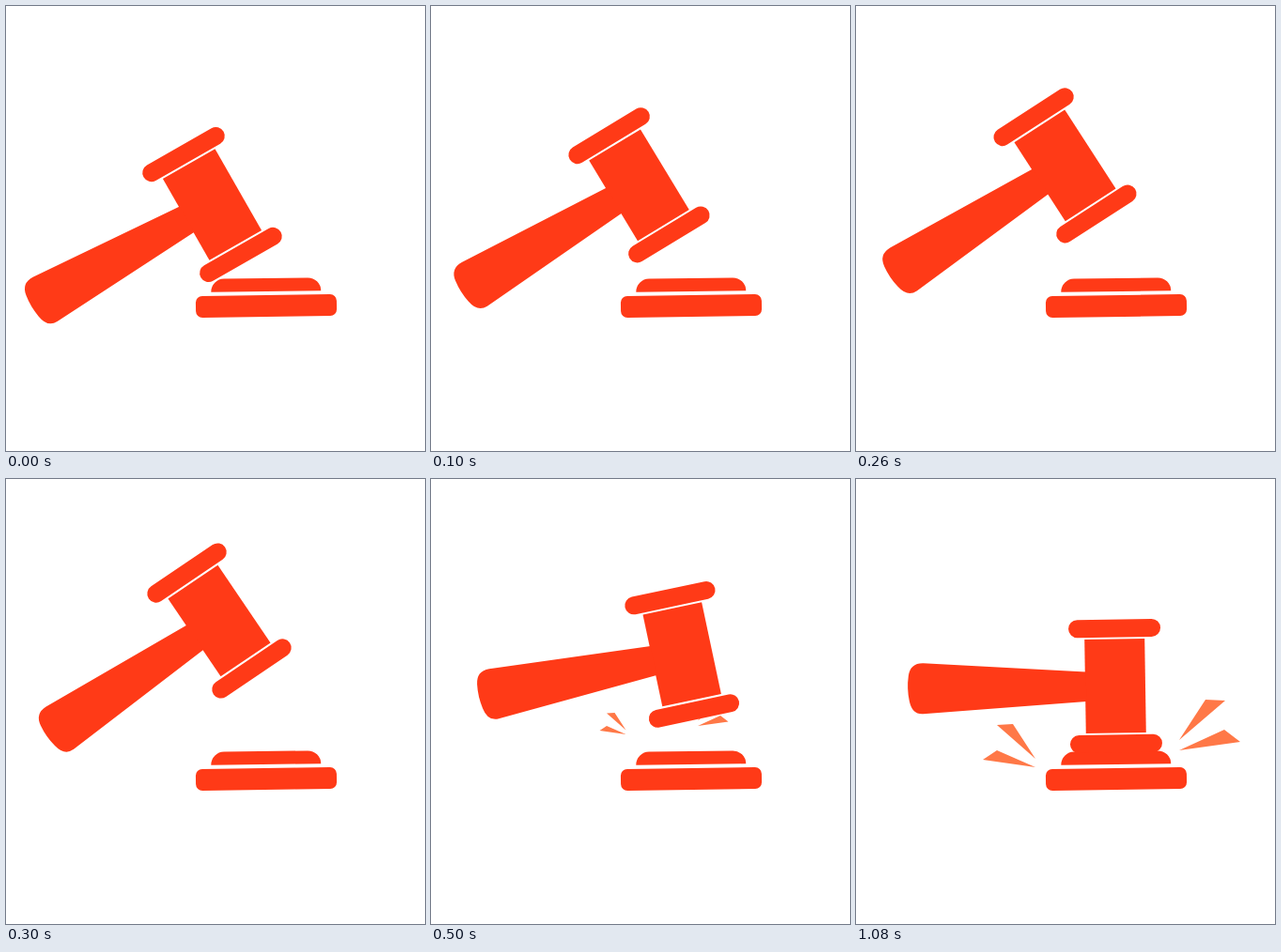
An HTML page that plays this animation: 446x474 px, repeating every 1400 ms.

```html
<!DOCTYPE html>
<html lang="en">
<head>
<meta charset="utf-8">
<title>Gavel</title>
<style>
  html, body { margin: 0; width: 100%; height: 100%; overflow: hidden; background: #fff; }
  svg { display: block; width: 100%; height: 100%; fill: #ff3a17; }
</style>
</head>
<body>
<svg viewBox="0 0 446 474">
  <g transform="translate(277 319.5) rotate(-0.8)">
    <rect x="-75" y="-11.5" width="150" height="23" rx="7"/>
    <path d="M-58.5-15.5a14 14 0 0 1 14-14h89a14 14 0 0 1 14 14z"/>
  </g>
  <path id="sparks" fill="#ff7847" d="M150 262L167 261 191 298zM135 299L150 289 191 307zM372 235L393 236 344 278zM392 267L409 280 344 289z"/>
  <!-- Upright gavel, centred on the middle of its head -->
  <g id="gavel">
    <rect x="-49" y="-71" width="98" height="19" rx="9.5"/>
    <rect x="-32" y="-50" width="64" height="100"/>
    <rect x="-49" y="52" width="98" height="19" rx="9.5"/>
    <path d="M-31-15.5L-204-27.5Q-218-28-220-14Q-222-1-219.5 12Q-217 27-205 26.5L-31 16z"/>
  </g>
</svg>
<script>
const STEP = 100, LOOP = 1400;

// Head centre x, y and tilt in degrees; the last pose is held until the loop ends.
const poses = [
  [219.5, 211.5, -29.7],
  [221.5, 190.8, -31.2],
  [222.5, 169.8, -32.9],
  [227, 151, -34.1],
  [254.3, 155, -23.2],
  [267.2, 186.8, -12],
  [276, 220.5, -0.9],
];
const gavel = document.getElementById('gavel');
const sparks = document.getElementById('sparks');

function draw(now) {
  const step = Math.min(Math.floor((now % LOOP) / STEP), poses.length - 1);
  const [x, y, tilt] = poses[step];
  gavel.setAttribute('transform', `translate(${x} ${y}) rotate(${tilt})`);

  const impact = poses.length - 1;
  sparks.setAttribute('visibility', step >= impact - 1 ? 'visible' : 'hidden');
  sparks.setAttribute('transform', step < impact ? 'translate(112 118.5) scale(0.5)' : '');
}

const start = performance.now();
function tick() {
  draw(performance.now() - start);
  requestAnimationFrame(tick);
}
tick();
</script>
</body>
</html>
```
